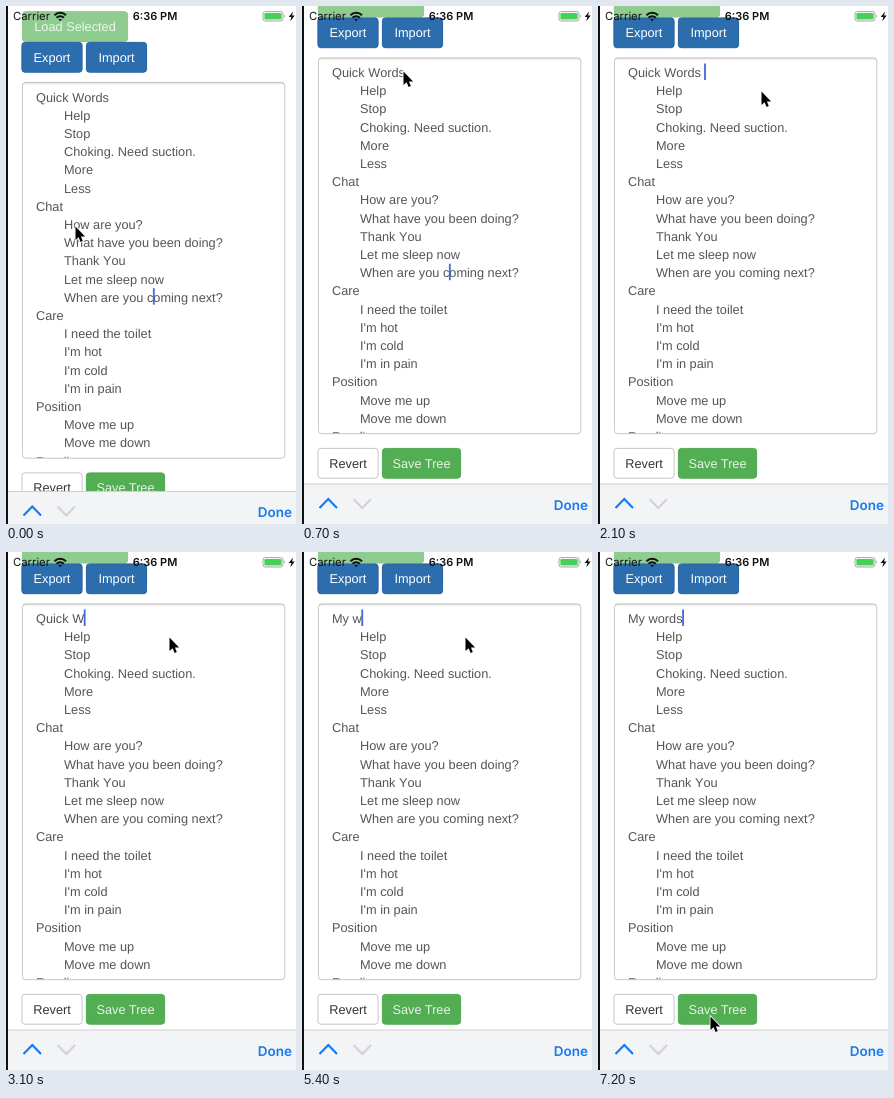
These frames come from a looping animation (290x518 px, 7.3 s). An HTML page:

```html
<!DOCTYPE html>
<html lang="en">
<head>
<meta charset="utf-8">
<title>Editing a word tree</title>
<style>
  html, body { margin: 0; width: 100%; height: 100%; overflow: hidden; background: #fff; }
  svg { display: block; width: 290px; height: 518px; }
  text { font: 12.75px "Liberation Sans", Arial, sans-serif; white-space: pre; text-rendering: geometricPrecision; }
  .rows text { fill: #555; font-kerning: none; }
  .system { font: 11.3px Inter, sans-serif; fill: #111; }
  .bold { font-weight: 600; font-size: 11px; }
  .done { font-size: 13.5px; fill: #1479f0; }
</style>
</head>
<body>
<svg viewBox="0 0 290 518">
  <defs>
    <clipPath id="inside"><rect x="17" y="52" width="261" height="375.2"/></clipPath>
    <linearGradient id="inset" x2="0" y2="1">
      <stop stop-color="#000" stop-opacity=".1"/>
      <stop offset="1" stop-color="#000" stop-opacity="0"/>
    </linearGradient>
  </defs>
  <rect width="290" height="518" fill="#fff"/>

  <g id="page">
    <g id="buttons" text-anchor="middle"></g>
    <rect x="16.4" y="51.9" width="262.4" height="375.8" rx="3.5" fill="#fff" stroke="#c6c6c6"/>
    <rect x="17" y="52.3" width="261" height="2.5" fill="url(#inset)"/>
    <g id="rows" class="rows" clip-path="url(#inside)"></g>
    <rect id="caret" width="1.8" height="16.5" fill="#4268d8"/>
  </g>

  <g id="toolbar">
    <rect y="478" width="290" height="50" fill="#f3f4f6"/>
    <path d="M0 478H290" stroke="#cfcfd2"/>
    <g fill="none" stroke-width="2.1">
      <path d="M17.5 502L26.3 493 35 502" stroke="#1479f0"/>
      <path d="M51.5 493L60.3 502 69 493" stroke="#d2d2d5"/>
    </g>
    <text class="system bold done" x="268.8" y="503.6" text-anchor="middle">Done</text>
  </g>

  <text class="system" x="7" y="14.3">Carrier</text>
  <g fill="none" stroke="#111" stroke-width="2.1">
    <path d="M48.4 9.2A8.2 8.2 0 0 1 60 9.2M50.6 11.8A5 5 0 0 1 57.8 11.8"/>
    <path d="M52.4 13L54.2 15.3 56 13Z" fill="#111" stroke="none"/>
  </g>
  <text class="system bold" x="149" y="14.3" text-anchor="middle">6:36 PM</text>
  <rect x="257" y="5.6" width="20" height="9.4" rx="2.3" fill="none" stroke="#999" stroke-width=".9"/>
  <rect x="258.4" y="7" width="17.2" height="6.6" rx="1.2" fill="#45d158"/>
  <path d="M278.3 8.6Q280 10.3 278.3 12Z" fill="#999"/>
  <path d="M287 5.4L282.7 10.9H285.3L284.3 15.3 288.8 9.5H286.1Z" fill="#111"/>
  <rect width="2" height="518" fill="#111"/>

  <path id="pointer" d="M0 0V13.6L3.1 10.8 5.1 15.4 7.3 14.4 5.4 10H9.6Z"
        fill="#000" stroke="#fff" stroke-width="1.6" paint-order="stroke"/>
</svg>

<script>
const LOOP = 7300, STEP = 100, LINE = 18.2;
const TAP = 1650, DELETE_START = 2400, DELETE_EVERY = 155;
const OLD = "Quick Words ", NEW = "My words";
const TYPED = [4700, 4900, 5100, 5300, 5500, 5650, 5800, 6000];
const POINTER = [
  [200, 69.5, 220.5], [650, 101.5, 65.5], [1700, 101.5, 65.5], [2050, 163.5, 85.5],
  [6050, 163.5, 85.5], [6500, 116.5, 353.5], [7000, 112.5, 464.5]
];
const LINES = [
  OLD, "\tHelp", "\tStop", "\tChoking. Need suction.", "\tMore", "\tLess",
  "Chat", "\tHow are you?", "\tWhat have you been doing?", "\tThank You",
  "\tLet me sleep now", "\tWhen are you coming next?",
  "Care", "\tI need the toilet", "\tI'm hot", "\tI'm cold", "\tI'm in pain",
  "Position", "\tMove me up", "\tMove me down", "Reading"
];
const CARET_ROW = 11, CARET_COLUMN = 14;

const $ = id => document.getElementById(id);
const clamp = v => Math.min(1, Math.max(0, v));
const move = (el, x, y) => el.setAttribute("transform", `translate(${x} ${y})`);

function add(parent, tag, attrs, content = "") {
  const el = document.createElementNS("http://www.w3.org/2000/svg", tag);
  for (const key in attrs) el.setAttribute(key, attrs[key]);
  el.textContent = content;
  return parent.appendChild(el);
}

function button(label, x, y, width, fill, stroke, color = "#fff") {
  add($("buttons"), "rect", { x: x + .4, y: y + .4, width: width - .8, height: 29.8, rx: 3, fill, stroke });
  add($("buttons"), "text", { x: x + width / 2, y: y + 19.6, fill: color }, label);
}
button("Load Selected", 16, -19.2, 106, "#90cc90", "#8bc78b", "#eaf6ea");
button("Export", 15.5, 11.5, 61, "#2c6dae", "#2860a0");
button("Import", 80, 11.5, 61, "#2c6dae", "#2860a0");
button("Revert", 15.5, 442, 61, "#fff", "#c6c6c6", "#333");
button("Save Tree", 80, 442, 79, "#52ad53", "#4fa950", "#e6f4e6");

const rows = LINES.map((line, i) => add($("rows"), "text",
  { x: line[0] === "\t" ? 58 : 30, y: 71 + i * LINE }, line.trimStart()));
const caretStart = 58 + rows[CARET_ROW].getSubStringLength(0, CARET_COLUMN);

function heading(t) {
  if (t >= TYPED[0]) return NEW.slice(0, TYPED.filter(at => at <= t).length);
  const deleted = t < DELETE_START ? 0 : 1 + Math.floor((t - DELETE_START) / DELETE_EVERY);
  return OLD.slice(0, Math.max(0, OLD.length - deleted));
}

function caretOpacity(t) {
  if (t >= DELETE_START && t < TYPED[7]) return 1;
  const idle = t < TAP ? t + 300 : t < DELETE_START ? t - TAP : t - TYPED[7];
  const phase = idle % 1000;
  return phase < 800 ? 1 - clamp((phase - 450) / 100) : (phase - 800) / 200;
}

function pointerAt(t) {
  const next = POINTER.findIndex(p => p[0] > t);
  if (next < 0) return POINTER.at(-1).slice(1);
  const [t0, x0, y0] = POINTER[Math.max(0, next - 1)], [t1, x1, y1] = POINTER[next];
  const k = t1 > t0 ? clamp((t - t0) / (t1 - t0)) : 0, ease = k * k * (3 - 2 * k);
  return [x0 + (x1 - x0) * ease, y0 + (y1 - y0) * ease];
}

function draw(t) {
  const slide = (1 - clamp(t / 300)) ** 2;
  move($("page"), 0, 24.5 * slide);
  move($("toolbar"), 0, 7.5 * slide);
  move($("pointer"), ...pointerAt(t));

  const text = heading(t), tapped = t >= TAP;
  if (rows[0].textContent !== text) rows[0].textContent = text;
  const x = tapped ? 30 + (text && rows[0].getComputedTextLength()) : caretStart;
  $("caret").setAttribute("x", +x - .4);
  $("caret").setAttribute("y", 57.5 + (tapped ? 0 : CARET_ROW * LINE));
  $("caret").setAttribute("opacity", caretOpacity(t));
}

const start = performance.now();
function tick() {
  const t = (performance.now() - start) % LOOP;
  draw(Math.floor(t / STEP) * STEP);
  requestAnimationFrame(tick);
}
tick();
</script>
</body>
</html>
```
